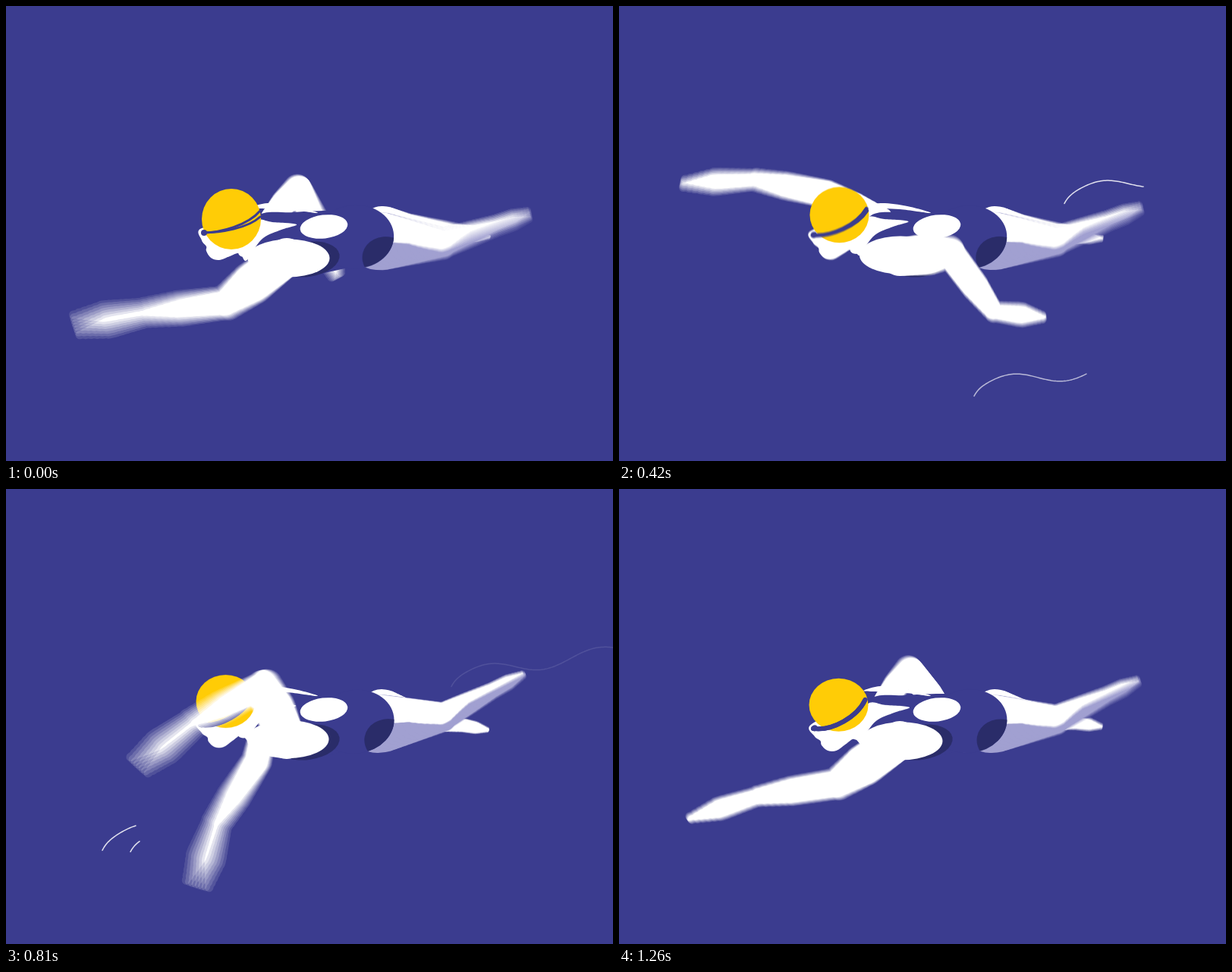
These frames come from a looping animation (800x600 px, 1.29 s). An HTML page with a canvas:

```html
<!DOCTYPE html>
<html lang="en">
<head>
<meta charset="utf-8">
<title>Swimmer</title>
<style>
html, body { margin: 0; height: 100%; overflow: hidden; background: #3b3c8f; }
canvas { display: block; width: 100vw; height: 100vh; }
</style>
</head>
<body>
<canvas id="stage" width="800" height="600"></canvas>
<script>
const LOOP = 1290, STEP = 30, KICK = LOOP / 3, SHUTTER = 16, SAMPLES = 8;
const BLUE = '#3b3c8f', NAVY = '#2a2c69', LILAC = '#a1a0d1', YELLOW = '#ffcc06', WHITE = '#fff';
const { PI, sin, cos } = Math;

const stage = document.getElementById('stage').getContext('2d');
const layer = document.createElement('canvas');
layer.width = 800;
layer.height = 600;
const g = layer.getContext('2d');
g.lineCap = g.lineJoin = 'round';

const clamp = (v, lo = 0, hi = 1) => Math.min(hi, Math.max(lo, v));
const smooth = u => u * u * (3 - 2 * u);
const cycle = (t, period, peak) => cos(2 * PI * (t - peak) / period);

function fill(color) {
  g.fillStyle = color;
  g.fill();
}

function oval(x, y, rx, ry, tilt, color) {
  g.beginPath();
  g.ellipse(x, y, rx, ry, tilt, 0, 2 * PI);
  fill(color);
}

// Closed smooth shape through points
function blob(points, color) {
  const at = i => points[(i + points.length) % points.length];
  g.beginPath();
  g.moveTo(...points[0]);
  points.forEach((b, i) => {
    const a = at(i - 1), c = at(i + 1), d = at(i + 2);
    g.bezierCurveTo(b[0] + (c[0] - a[0]) / 6, b[1] + (c[1] - a[1]) / 6,
      c[0] - (d[0] - b[0]) / 6, c[1] - (d[1] - b[1]) / 6, ...c);
  });
  fill(color);
}

function stroke(width, color) {
  g.lineWidth = width;
  g.strokeStyle = color;
  g.stroke();
}

// Joint positions from bones given as [length, angle]
function chain(x, y, bones) {
  return [[x, y], ...bones.map(([len, angle]) => [x += len * cos(angle), y += len * sin(angle)])];
}

// Tapered limb; widths sit at joints and bone middles, shade trims the lower side
function limb(joints, widths, color, shade = widths.map(() => 0)) {
  const steps = 12;
  for (let b = 0; b < joints.length - 1; b++) {
    const [[x, y], [x2, y2]] = [joints[b], joints[b + 1]];
    const dx = x2 - x, dy = y2 - y, len = Math.hypot(dx, dy);
    for (let i = 0; i < steps; i++) {
      const u = i / steps, f = 2 * (b + u), k = Math.floor(f);
      const along = list => list[k] + (list[k + 1] - list[k]) * (f - k);
      const w = along(widths), s = along(shade), off = w * s / 2 / len;
      g.beginPath();
      g.moveTo(x + dx * u + dy * off, y + dy * u - dx * off);
      g.lineTo(x + dx * (u + 1 / steps) + dy * off, y + dy * (u + 1 / steps) - dx * off);
      stroke(w * (1 - s), color);
    }
  }
}

// Bone angles in degrees at the beats of a stroke
const BEATS = [0, 300, 540, 690, 900, 1050, 1260];
const nearArm = {
  x: 370, y: 331, reach: 82, fore: 106, fold: .08, widths: [50, 54, 38, 36, 23, 28, 8],
  upper: [143, 38, -45, -69, -143, -167, -215],
  lower: [173, 67, 56, 87, 192, 171, 171],
  hand: [170, 26, 12, 74, 181, 164, 162]
};
const farArm = {
  x: 348, y: 278, reach: 70, fore: 96, fold: .4, widths: [24, 34, 36, 34, 23, 28, 8],
  upper: [-45, -136, -178, -221, -284, -321, -408],
  lower: [62, 198, 169, 175, 82, 59, 50],
  hand: [71, 182, 161, 173, 55, 19, 60]
};

function tween(values, t) {
  const last = BEATS.length - 1;
  const i = clamp(BEATS.findLastIndex(b => t >= b), 0, last - 1);
  const span = BEATS[i + 1] - BEATS[i], u = (t - BEATS[i]) / span;
  const slope = k => {
    const lo = Math.max(k - 1, 0), hi = Math.min(k + 1, last);
    return (values[hi] - values[lo]) / (BEATS[hi] - BEATS[lo]) * span;
  };
  const m = slope(i), n = slope(i + 1), d = values[i + 1] - values[i];
  return values[i] + u * (m + u * (3 * d - 2 * m - n + u * (m + n - 2 * d)));
}

// Bones pointing backwards look shorter
function drawArm(arm, t) {
  const [a, b, c] = [arm.upper, arm.lower, arm.hand].map(list => tween(list, t) * PI / 180);
  const fold = 1 - arm.fold * Math.max(0, cos(a));
  limb(chain(arm.x, arm.y, [
    [arm.reach - 15 * cos(a) + 10 * sin(a), a],
    [arm.fore * fold, b],
    [(82 - 12 * cos(c)) * fold, c]
  ]), arm.widths, WHITE);
}

function drawLegs(kick) {
  const thigh = .21 + .33 * kick, shin = -.13 + .37 * kick, farShin = -.05 - .25 * kick;
  const near = chain(489, 310, [[86, thigh], [70, shin], [50, shin]]);
  const far = chain(495, 291, [[55, -.07 - .27 * kick], [50, farShin], [36, farShin]]);
  const widths = [76, 56, 36, 29, 21, 19, 7], edge = .5 * clamp((-.2 - shin) / .15);
  limb(far, [54, 40, 32, 26, 18, 16, 5], WHITE);
  limb(near, widths, LILAC);
  limb(near, widths, WHITE, [.5, .47, .25, edge, edge, edge, edge]);
  return thigh;
}

function drawHips(tilt) {
  g.save();
  g.translate(490, 300);
  g.rotate(tilt);
  oval(-30, 3, 51, 42, 0, BLUE);
  g.clip();
  oval(11, 34, 33, 29, .3, NAVY);
  g.restore();
}

function drawTorso(bob) {
  blob([[330, 278], [380, 272], [430, 270], [470, 272], [480, 330], [420, 352], [373, 357], [320, 332]], BLUE);
}

function drawBack(bob) {
  blob([[322, 266], [345, 260], [380, 264], [411, 273], [370, 268], [335, 267]], WHITE);
  oval(419, 291, 31.5, 15.5, -.12, WHITE);
  oval(398, 334, 42, 23, -.15, NAVY);
  g.save();
  g.translate(bob, 2.5 * bob - 2.5);
  blob([[326, 284], [350, 285], [382, 288], [362, 295], [338, 306], [317, 330], [305, 322]], WHITE);
  oval(371.5, 332.5, 54, 25, 0, WHITE);
  g.restore();
}

// The head turns from looking ahead (0) to looking down (1)
function drawHead(down, bob) {
  g.save();
  g.translate(294 - 6 * down + 3 * bob * (1 - down), 276 + 5 * bob + 8 * down);
  g.save();
  g.rotate(-.26 * down);
  blob([[-39, 12], [-39, 28], [-33, 36], [-33, 42], [-27, 51], [-16, 54], [-2, 49], [11, 45], [19, 55], [29, 38], [20, 5]], WHITE);
  g.restore();
  oval(1.5 * down, -4 * down, 39, 40 - 5 * down, 0, YELLOW);
  g.rotate(-.26 * down);
  const sag = 10 * down;
  for (const lift of [0, 8 - 8 * down]) {
    g.beginPath();
    g.moveTo(-38, 18);
    g.bezierCurveTo(-14, 18 + sag, 22, 8 + sag + lift / 2, 38, -11 + sag + lift);
    stroke(3 + 3 * down, BLUE);
  }
  oval(-36, 18, 4, 4, 0, BLUE);
  g.restore();
}

const ripples = [
  { x: 587, y: 254, length: 240, slope: .15, start: 290, speed: .8, life: 570 },
  { x: 702, y: 215, length: 26, slope: 0, start: 500, speed: .8, life: 300 },
  { x: 468, y: 508, length: 243, slope: .13, start: 235, speed: .8, life: 400 },
  { x: 582, y: 469, length: 26, slope: 0, start: 480, speed: .8, life: 150 },
  { x: 127, y: 470, length: 361, slope: .23, start: 775, speed: 1.3, life: 450 },
  { x: 164, y: 472, length: 226, slope: .13, start: 800, speed: 1.3, life: 450 },
  { x: 447, y: 436, length: 50, slope: .0, start: 980, speed: 1.3, life: 240 }
];

// Long ripples are climbing waves with a steep start, short ones a single dip
function drawRipple({ x, y, length, slope, start, speed, life }, t) {
  const age = t - start;
  if (age < 0 || age > life) return;
  const long = length > 60;
  g.beginPath();
  for (let d = 0; d <= Math.min(length, age * speed); d += 2) {
    const wave = long ? -9 * sin(2 * PI * (d - 12) / 145) - 9 * (1 - Math.exp(-d / 6)) + 2 : 3 * sin(PI * d / length);
    g.lineTo(x + d, y - slope * d + wave);
  }
  stroke(1.5, `rgba(255,255,255,${Math.min(.85, 1.2 * (1 - age / life))})`);
}

function drawSwimmer(t) {
  const bob = cycle(t, LOOP / 2, 5), down = smooth(clamp((t - 330) / 150));
  g.fillStyle = BLUE;
  g.fillRect(0, 0, 800, 600);
  drawArm(farArm, t);
  const thigh = drawLegs(cycle(t, KICK, 145));
  drawTorso();
  drawHips((thigh - .11) * .6);
  drawBack(bob);
  drawHead(down, bob);
  drawArm(nearArm, t);
}

// Averages several moments inside the shutter for motion blur
function render(t) {
  for (let i = 0; i < SAMPLES; i++) {
    drawSwimmer(t + SHUTTER * ((i + .5) / SAMPLES - .5));
    ripples.forEach(r => drawRipple(r, t));
    stage.globalAlpha = 1 / (i + 1);
    stage.drawImage(layer, 0, 0);
  }
}

const begin = performance.now();
let shown = -1;
function tick() {
  const t = Math.floor((performance.now() - begin) % LOOP / STEP) * STEP;
  if (t !== shown) render(shown = t);
  requestAnimationFrame(tick);
}
tick();
</script>
</body>
</html>
```
